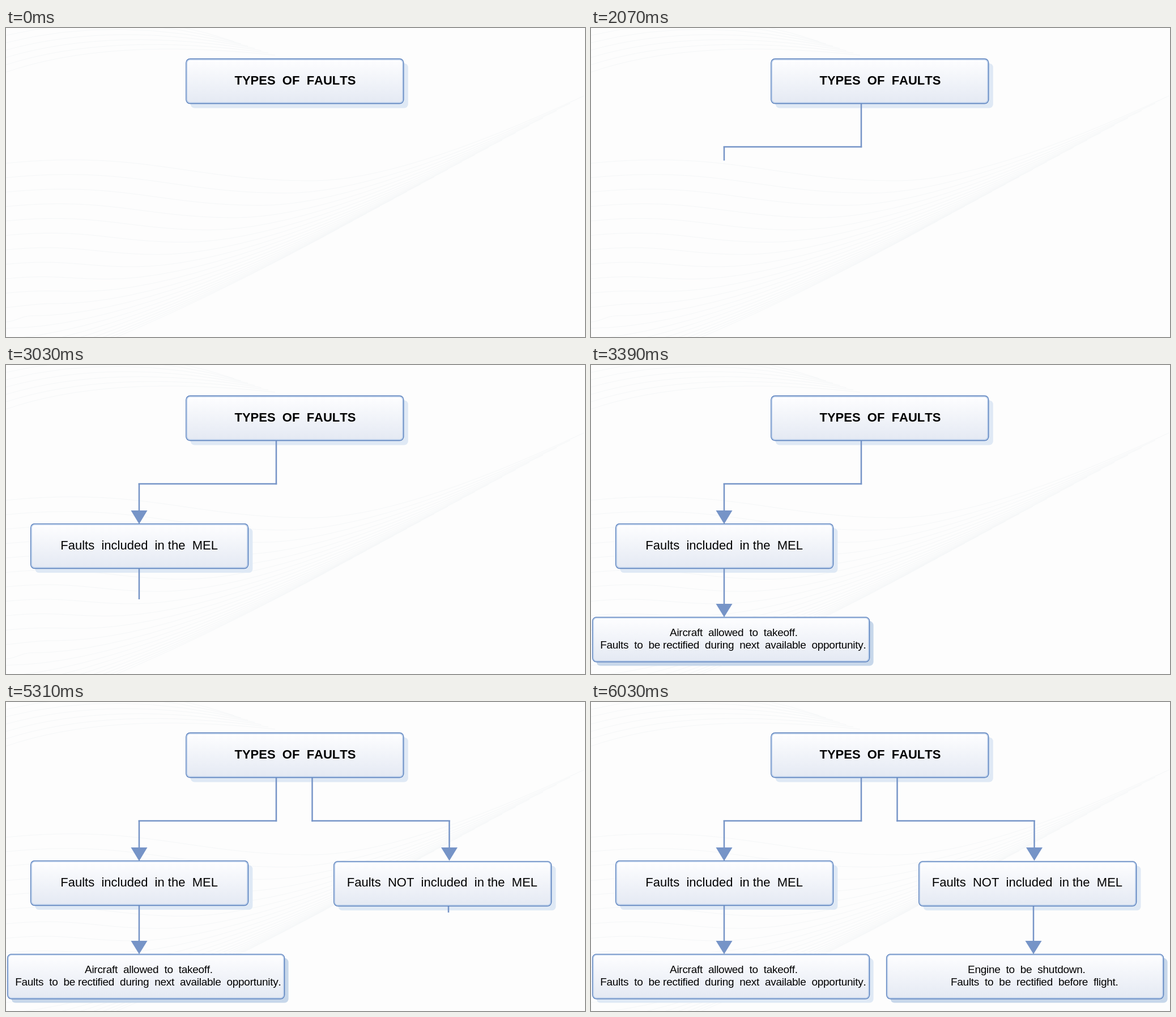
Write an HTML page that moves like this. It is 1022 px wide and 546 px high and loops after 7.07 s.

```html
<!DOCTYPE html>
<html lang="en">
<head>
<meta charset="utf-8">
<title>Types of faults</title>
<style>
  html, body { margin: 0; width: 100%; height: 100%; overflow: hidden; background: #fdfdfd; }
  svg { display: block; width: 1022px; height: 546px; }
  text { font-family: "Liberation Sans", Arial, sans-serif; font-size: 22px; font-kerning: none; white-space: pre; }
  .title { font-weight: bold; }
  .small { font-size: 19px; letter-spacing: -.28px; }
  .waves { fill: none; stroke: #f5f7f8; }
  .line { stroke: #7694c7; stroke-width: 2.5; }
  .head { fill: #7694c7; }
</style>
</head>
<body>
<svg viewBox="0 0 1022 546">
  <defs>
    <linearGradient id="panel" x2="0" y2="1">
      <stop stop-color="#fefeff"/>
      <stop offset="1" stop-color="#e4e9f3"/>
    </linearGradient>
  </defs>
  <g class="waves"></g>
  <g class="chart"></g>
</svg>
<script>
const LOOP = 7070;
const PALE = '#dfe9f5', DEEP = '#c7d7ea';
const waves = document.querySelector('.waves');
const chart = document.querySelector('.chart');

function wavePaths() {
  let d = '';
  for (let i = 0; i < 20; i++) {
    const startY = 239 + 25.5 * i;
    const lowX = 540 - 45 * i, lowY = 270 + 21.7 * i;
    const endX = 1020 - 24 * i, endY = 120 + 13 * i;
    d += `M${Math.min(0, lowX)} ${startY}C${lowX * .45} ${startY - 24 + 2 * i} ${lowX * .6} ${lowY} ${lowX} ${lowY}`;
    d += `Q${lowX + (endX - lowX) * .33} ${lowY} ${endX} ${endY}`;
  }
  for (let i = 0; i < 7; i++) {
    d += `M0 ${78 - 13 * i}Q${180 + 4 * i} ${16 - 10 * i} ${475 - 12 * i} ${48 - 4 * i}`;
  }
  return `<path d="${d}"/>`;
}

const label = (x, y, text, kind = '') => `<text class="${kind}" x="${x}" y="${y}">${text}</text>`;

const rect = (x, y, w, h, r, style) =>
  `<rect x="${x}" y="${y}" width="${w}" height="${h}" rx="${r}" ${style}/>`;

const box = (x, y, w, shadow, offset, content) =>
  rect(x + offset, y + offset, w, 79, 7, `class="shadow" fill="${shadow}"`) +
  rect(x, y, w, 79, 7, 'fill="url(#panel)" stroke="#4f78b8" stroke-width="1.3"') +
  rect(x + 1.5, y + 1.5, w - 3, 76, 5.5, 'fill="none" stroke="#b3c9e8" stroke-width="1.5"') +
  content;

const line = (x1, y1, x2, y2) =>
  `<line class="line" x1="${x1}" y1="${y1}" x2="${x2}" y2="${y2}"/>`;

const arrow = (x, top, neck, tip) =>
  line(x, top, x, neck + 1) +
  `<path class="head" d="M${x - 14.5} ${neck}h29L${x} ${tip}z"/>`;

// Each part is revealed by a wipe over its area between two steps.
const parts = [];
function wipe(from, to, x, y, w, h, content, dir = 'down') {
  const id = 'wipe' + parts.length;
  parts.push({ from, to, x, y, w, h, dir, id });
  return `<clipPath id="${id}"><rect x="${x}" y="${y}" width="${w}" height="${h}"/></clipPath>` +
    `<g clip-path="url(#${id})">${content}</g>`;
}

waves.innerHTML = wavePaths();
chart.innerHTML =
  box(317.8, 54.5, 384, PALE, 8, label(403.5, 100, 'TYPES  OF  FAULTS', 'title')) +

  wipe(-.55, 2.9, 474, 134, 6, 77.3, line(477, 134, 477, 212)) +
  wipe(3, 6, 233.7, 208, 244.5, 4, line(233, 210, 479, 210), 'left') +
  wipe(6.6, 10.6, 220, 209, 30, 72, arrow(235, 209, 257, 281)) +
  wipe(11.55, 14.2, 42, 280, 396, 87.5,
    box(43.6, 280.5, 384, PALE, 7.8, label(96.3, 326, 'Faults  included  in the  MEL'))) +
  wipe(14.3, 17, 220, 360, 30, 86, arrow(235, 360, 422, 445.5)) +
  `<g id="allowed">` +
  wipe(17, 19, 0, 445, 500, 87,
    box(2.6, 445.6, 489, DEEP, 7,
      label(139, 479, 'Aircraft  allowed  to  takeoff.', 'small') +
      label(16.2, 501, 'Faults  to  be rectified  during  next  available  opportunity.', 'small'))) +
  `</g>` +

  wipe(19.93, 23.6, 538, 134, 6, 77.3, line(540.5, 134, 540.5, 212)) +
  wipe(23.5, 27, 539.3, 208, 244.5, 4, line(539, 210, 785, 210), 'right') +
  wipe(27.9, 31.9, 767, 209, 31, 72, arrow(782.5, 209, 257, 280.5)) +
  wipe(31.95, 34.4, 577, 281, 396, 87.5,
    box(578.7, 281.6, 384, PALE, 7.8, label(601.8, 326, 'Faults  NOT  included  in the  MEL'))) +
  wipe(34.6, 37.7, 766, 361, 30, 85, arrow(781, 361, 422, 445.5)) +
  wipe(37.88, 40.3, 520, 445, 500, 87,
    box(521.6, 445.6, 489, DEEP, 7,
      label(665, 479, 'Engine  to  be  shutdown.', 'small') +
      label(635, 501, 'Faults  to  be  rectified  before  flight.', 'small')));

for (const part of parts) part.mask = document.querySelector(`#${part.id} rect`);
const allowedShadow = document.querySelector('#allowed .shadow');

// The wipes advance in hard steps: quick ones at first, then every 120 ms.
function stepAt(t) {
  if (t < 1400) return -1;
  if (t < 1830) return Math.min(5, Math.floor((t - 1400) / 70));
  return Math.min(41, 6 + Math.floor((t - 1830) / 120));
}

function render(t) {
  const step = stepAt(t);
  for (const { from, to, x, w, h, dir, mask } of parts) {
    const shown = Math.max(0, Math.min(1, (step - from) / (to - from)));
    if (dir === 'down') {
      mask.setAttribute('height', Math.round(h * shown * 10) / 10);
    } else {
      mask.setAttribute('width', w * shown);
      if (dir === 'left') mask.setAttribute('x', x + w * (1 - shown));
    }
  }
  allowedShadow.setAttribute('fill', step >= 41 ? PALE : DEEP);
}

const begin = performance.now();
function tick() {
  render((performance.now() - begin) % LOOP);
  requestAnimationFrame(tick);
}
tick();
</script>
</body>
</html>
```
